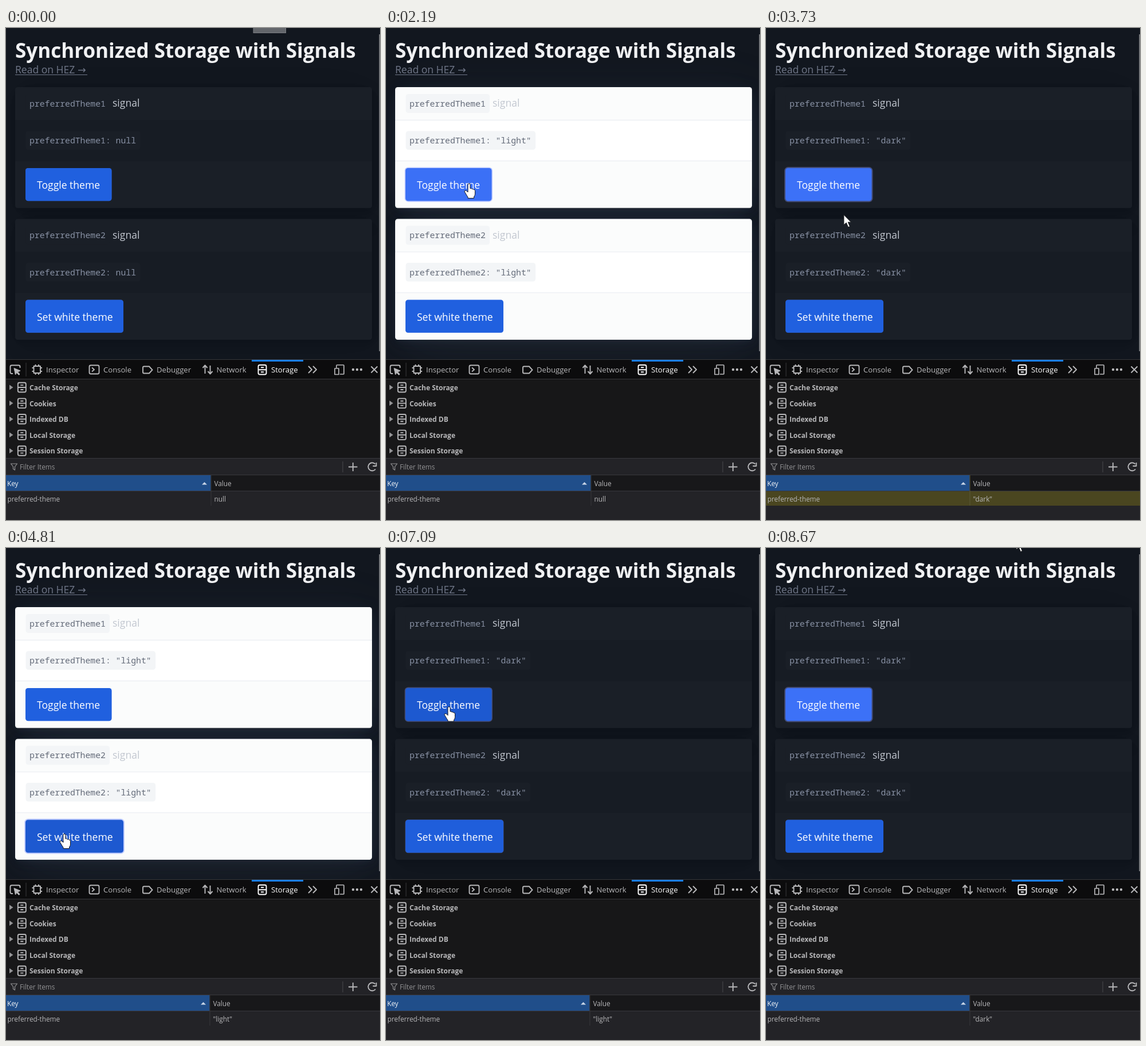
Animation of 653x857 px, one loop 8930 ms. Source, as an HTML page:

```html
<!DOCTYPE html>
<html lang="en">
<head>
<meta charset="utf-8">
<title>Synchronized Storage with Signals</title>
<style>
html, body { margin: 0; width: 100%; height: 100%; overflow: hidden; background: #12171f; }
.shade { position: absolute; left: 16px; width: 623px; height: 210.5px; border-radius: 4.6px; }
svg { position: absolute; left: 0; top: 0; }
text { font-family: "Open Sans", "Noto Sans", sans-serif; white-space: pre; }
.page { font-size: 17.55px; }
.code { font: 14.77px "Noto Sans Mono", "DejaVu Sans Mono", monospace; }
.arrow { font-family: "DejaVu Sans", sans-serif; }
.tab { font-size: 13.1px; fill: #b8b8ba; }
.tree { font-size: 12px; font-weight: 700; fill: #b8b8ba; }
.cell { font-size: 11.8px; fill: #b8b8ba; }
.icon { fill: none; stroke: #b8b8ba; stroke-width: 1.9; stroke-linejoin: round; }
</style>
</head>
<body>
<div class="shade" style="top:103px"></div>
<div class="shade" style="top:332.5px"></div>
<svg id="stage" width="653" height="857" viewBox="0 0 653 857"></svg>
<script>
const LOOP = 8930, FADE = 200, FLASH = 210;
const BASE = [32, 96, 223], HOVER_DARK = [60, 113, 247], HOVER_LIGHT = [29, 89, 208];
const THEMES = {
  dark: { body: '#171c24', section: '#1a1f27', line: 'none', code: '#1a1f27', ink: '#8891a4', text: '#c2c7d0',
    ring: 'rgba(137,153,249,.375)', shade: '7,8,12', depth: .4 },
  light: { body: '#ffffff', section: '#fbfcfc', line: '#e7eaf0', code: '#f3f5f7', ink: '#646b79', text: '#c2c7d0',
    ring: 'rgba(190,203,255,.95)', shade: '129,145,181', depth: 1.3 }
};

// [time, value]: the value holds until the next entry
const signal = [[0, 'null'], [2170, '"light"'], [3070, '"dark"'], [4570, '"light"'], [7080, '"dark"']];
const stored = [[0, 'null'], [2310, '"light"'], [3190, '"dark"'], [4720, '"light"'], [7220, '"dark"']];
const flashes = [2660, 3540, 5070, 7650];
const buttons = [
  { width: 150.5, label: 'Toggle theme',
    fill: [[0, BASE], [1720, HOVER_DARK], [2170, HOVER_LIGHT], [3070, HOVER_DARK], [4410, BASE], [6620, HOVER_LIGHT], [7080, HOVER_DARK]],
    ring: [[0, [0]], [2050, [1]], [4410, [0]], [6960, [1]]] },
  { width: 171, label: 'Set white theme',
    fill: [[0, BASE], [4080, HOVER_DARK], [4570, HOVER_LIGHT], [6960, BASE]],
    ring: [[0, [0]], [4410, [1]], [6960, [0]]] }
];
const LEFT = 34, TOP = 244, TALL = 57.3, PITCH = 229.5;
const pointerPath = [
  [70, 432, 0], [190, 308, 282], [1380, 308, 282], [1830, 145, 271], [2860, 145, 271], [2920, 142, 258],
  [3070, 142, 258], [3270, 137, 271], [3540, 137, 271], [3730, 136, 325], [4140, 102, 498], [5250, 102, 498],
  [5400, 104, 488], [6070, 104, 488], [6140, 106, 482], [6690, 110, 276.5], [7750, 110, 276.5],
  [8530, 437, -12], [8670, 437, -15], [LOOP, 437, -15]
];

const clamp = v => Math.max(0, Math.min(1, v));
const lerp = (a, b, k) => a + (b - a) * k;
const current = (list, t) => list.filter(e => e[0] <= t).pop()[1];
const ease = k => k * k * (3 - 2 * k);
const transition = (list, t) => list.reduce((from, [at, to]) =>
  t < at ? from : from.map((v, i) => lerp(v, to[i], ease(clamp((t - at) / FADE)))), list[0][1]);

const rect = (x, y, w, h, fill, extra = '') => `<rect x="${x}" y="${y}" width="${w}" height="${h}" fill="${fill}" ${extra}/>`;
const text = (x, y, s, cls, extra = '') => `<text x="${x}" y="${y}" class="${cls}" ${extra}>${s}</text>`;
const icon = (d, extra = '') => `<path class="icon" d="${d}" ${extra}/>`;
const drawer = (x, y, extra = '') => `<g ${extra}>`
  + rect(x, y, 14, 16.5, 'none', 'class="icon" rx="2.5"')
  + icon(`M${x} ${y + 8.2}h14M${x + 4.5} ${y + 4.3}h5M${x + 4.5} ${y + 12.2}h5`) + '</g>';

const card = i => `<g class="card" transform="translate(0 ${i * PITCH})">
  ${rect(16, 103, 623, 210.5, '', 'class="section" rx="4.6"')}
  ${rect(16, 160, 623, 72, '', 'class="body"')}
  <path class="line" d="M16 160.5H639M16 231.5H639"/>
  ${rect(34.5, 115, 146.5, 33, '', 'class="chip" rx="4.6"')}
  ${text(41, 136.5, 'preferredTheme' + (i + 1), 'code ink')}
  ${text(186, 137, 'signal', 'page word')}
  ${rect(34.5, 179.5, 200, 32.5, '', 'class="chip value" rx="4.6"')}
  ${text(41, 201, '', 'code ink state')}
  ${rect(0, 0, 0, 0, '', 'class="ring"')}
  ${rect(LEFT, TOP, buttons[i].width, TALL, '', 'class="button" rx="4.6"')}
  ${text(54, 280, buttons[i].label, 'page', 'fill="#fff"')}
</g>`;

const tabs = [[70, 'Inspector'], [170, 'Console'], [263, 'Debugger'], [367.5, 'Network'], [463, 'Storage']];
const branches = ['Cache Storage', 'Cookies', 'Indexed DB', 'Local Storage', 'Session Storage'];

const devtools = rect(0, 577, 653, 280, '#232327')
  + rect(0, 577, 653, 1.3, '#36363a') + rect(0, 578, 653, 33, '#0c0c0d')
  + rect(0, 611, 653, 1, '#38383d') + rect(0, 612, 653, 137, '#171718')
  + rect(0, 749, 653, 1, '#38383d') + rect(0, 778, 653, 1, '#38383d')
  + rect(0, 779, 653, 27, '#18181a') + rect(0, 806, 653, 1, '#38383d')
  + rect(429, 578, 90, 3, '#1a80ee') + rect(34.5, 583, 1, 24, '#38383d') + rect(587.5, 755, 1, 19, '#4a4a4f')
  + tabs.map(([x, s]) => text(x, 600, s, 'tab', s == 'Storage' ? 'style="fill:#fff"' : '')).join('')
  + icon('M12 602H10Q7.5 602 7.5 599.5V590Q7.5 587.5 10 587.5H22Q24.500 587.5 24.5 590V592')
  + icon('M14 592.5L25 597L20.5 599L24 603L22.5 604.5L18.5 600.5L16.5 604Z', 'style="fill:#b8b8ba;stroke-width:1"')
  + icon('M48.5 589H60V601H48.5ZM51.5 589V586M57 589V586M51.5 601V604M57 601V604M45.5 592H48M45.5 598H48M60 592H63M60 598H63')
  + rect(145.5, 587.5, 17, 15, 'none', 'class="icon" rx="2.5"') + icon('M150 591.5L154 595L150 598.5')
  + icon('M241 589.5H250L255.5 595.5L250 601.5H241Q239 601.5 239 599.5V591.5Q239 589.5 241 589.5Z')
  + icon('M347.5 602V588M343.5 592L347.5 587.5L351.5 592M356.5 588V602M352.5 598L356.5 602.5L360.5 598')
  + drawer(440.5, 587, 'style="filter:brightness(1.38)"')
  + icon('M528 589L534 595L528 601M536 589L542 595L536 601')
  + icon('M577 592V588Q577 587 578 587H589Q590 587 590 588V602Q590 603 589 603H583M574 593H581V603.5H574Z', 'style="stroke-width:1.7"')
  + [606, 613, 620].map(x => `<circle cx="${x}" cy="595" r="2.2" fill="#b8b8ba"/>`).join('')
  + icon('M637.5 589.5L648.5 600.5M648.5 589.5L637.5 600.5')
  + branches.map((s, i) => {
      const y = 626 + i * 27.6;
      return `<path d="M6 ${y - 4.5}L12.5 ${y}L6 ${y + 4.5}Z" fill="#939395"/>` + drawer(20.8, y - 8.2) + text(41, y + 5, s, 'tree');
    }).join('')
  + icon('M8.5 759H19.5L15.5 764V770L12.5 768V764Z', 'style="stroke-width:1.2;stroke:#939395"')
  + text(24, 769, 'Filter Items', 'cell', 'style="fill:#939395"')
  + icon('M598 764.5H613.5M605.8 757V772')
  + icon('M645 768.5A7 7 0 1 1 644.5 759.5M646.5 757V763H640.5');

const arrow = 'M0 0V17.5L4.3 13.8L7.6 21.5L10.5 20.3L7.3 12.8H12.7Z';
const hand = 'M-2 2Q-2 0 0 0Q2 0 2 2V8.5Q4 7.5 5 9.5Q7 8.5 8 10.5Q10.5 9.8 10.5 12.5V18Q10.5 21 8.5 23V25.5H-2V23.5Q-4 21 -5.5 18L-8 14Q-8 12 -6 12Q-4.5 12 -2 15Z';

const stage = document.getElementById('stage');
stage.innerHTML = text(16, 52, 'Synchronized Storage with Signals', '', 'font-size="35" font-weight="700" fill="#f0f1f3"')
  + text(16, 79, 'Read on HEZ <tspan class="arrow">→</tspan>', 'page', 'fill="#6f7687"') + rect(16, 81, 126, 1, '#6f7687')
  + rect(651.5, 11, 1.5, 552, '#85878b')
  + card(0) + card(1) + devtools
  + '<g id="table"></g>' + rect(432, -2, 56.5, 10.5, '#63666b', 'id="flap" stroke="#7b7d82"')
  + '<path id="pointer" fill="#fff" stroke="#16181c" stroke-width="1" stroke-linejoin="round"/>';

const table = document.getElementById('table');
const flap = document.getElementById('flap');
const pointer = document.getElementById('pointer');
const cards = [...document.querySelectorAll('.card')];
const shades = document.querySelectorAll('.shade');

const set = (el, attrs) => { for (const k in attrs) el.setAttribute(k, attrs[k]); };
// Layered soft shadow: [x offset, alpha], blur is twelve times the offset
const shadow = ({ shade, depth }) => [[.6, .024], [1.2, .03], [2.1, .036], [3.9, .043], [9.3, .06]]
  .map(([x, a]) => `${x}px ${2 * x}px ${12 * x}px rgba(${shade},${a * depth})`).join(',');

function drawCard(el, i, t, state, theme) {
  const paint = (cls, fill) => el.querySelectorAll('.' + cls).forEach(n => n.setAttribute('fill', fill));
  paint('section', theme.section);
  paint('body', theme.body);
  paint('chip', theme.code);
  paint('ink', theme.ink);
  paint('word', theme.text);
  paint('ring', theme.ring);
  paint('button', `rgb(${transition(buttons[i].fill, t).map(Math.round)})`);
  set(el.querySelector('.line'), { stroke: theme.line });
  const label = `preferredTheme${i + 1}: ${state}`;
  el.querySelector('.state').textContent = label;
  set(el.querySelector('.value'), { width: label.length * 8.862 + 14 });
  const r = 2 * transition(buttons[i].ring, t)[0];
  set(el.querySelector('.ring'), { x: LEFT - r, y: TOP - r, width: buttons[i].width + 2 * r, height: TALL + 2 * r, rx: 4.6 + r });
}

function drawTable(t) {
  const value = current(stored, t);
  const flash = flashes.some(at => t >= at && t < at + FLASH);
  const col = value == 'null' ? 358 : 356;
  table.innerHTML = rect(0, 779, col - .5, 27, '#204e8a')
    + rect(0, 807, 653, 25, flash ? '#4a4620' : '#232327')
    + rect(col - .5, 779, 1, 53, flash ? '#5b5838' : '#38383d')
    + `<path d="M${col - 16} 795.5h9l-4.5 -4.5z" fill="#c9d6e8"/>`
    + text(2, 798, 'Key', 'cell', 'style="fill:#f0f3f7"') + text(col + 5.5, 798, 'Value', 'cell')
    + text(2.5, 825, 'preferred-theme', 'cell') + text(col + 5.5, 825, value, 'cell');
}

function drawPointer(t) {
  const next = Math.max(1, pointerPath.findIndex(p => p[0] > t));
  const [a, b] = [pointerPath[next - 1], pointerPath[next]];
  const k = clamp((t - a[0]) / (b[0] - a[0]));
  const x = lerp(a[1], b[1], k), y = lerp(a[2], b[2], k);
  const over = buttons.some((btn, i) => {
    const top = TOP + i * PITCH;
    return x > LEFT && x < LEFT + btn.width && y > top && y < top + TALL;
  });
  set(pointer, { d: over ? hand : arrow, transform: `translate(${x} ${y})`, opacity: t < 70 ? 0 : 1 });
}

function draw(now) {
  const t = now % LOOP;
  const state = current(signal, t);
  const theme = THEMES[state == '"light"' ? 'light' : 'dark'];
  shades.forEach(s => s.style.boxShadow = shadow(theme));
  cards.forEach((el, i) => drawCard(el, i, t, state, theme));
  drawTable(t);
  drawPointer(t);
  set(flap, { opacity: t < 120 ? 1 : 0 });
}

const start = performance.now();
function tick() {
  draw(performance.now() - start);
  requestAnimationFrame(tick);
}
tick();
</script>
</body>
</html>
```
